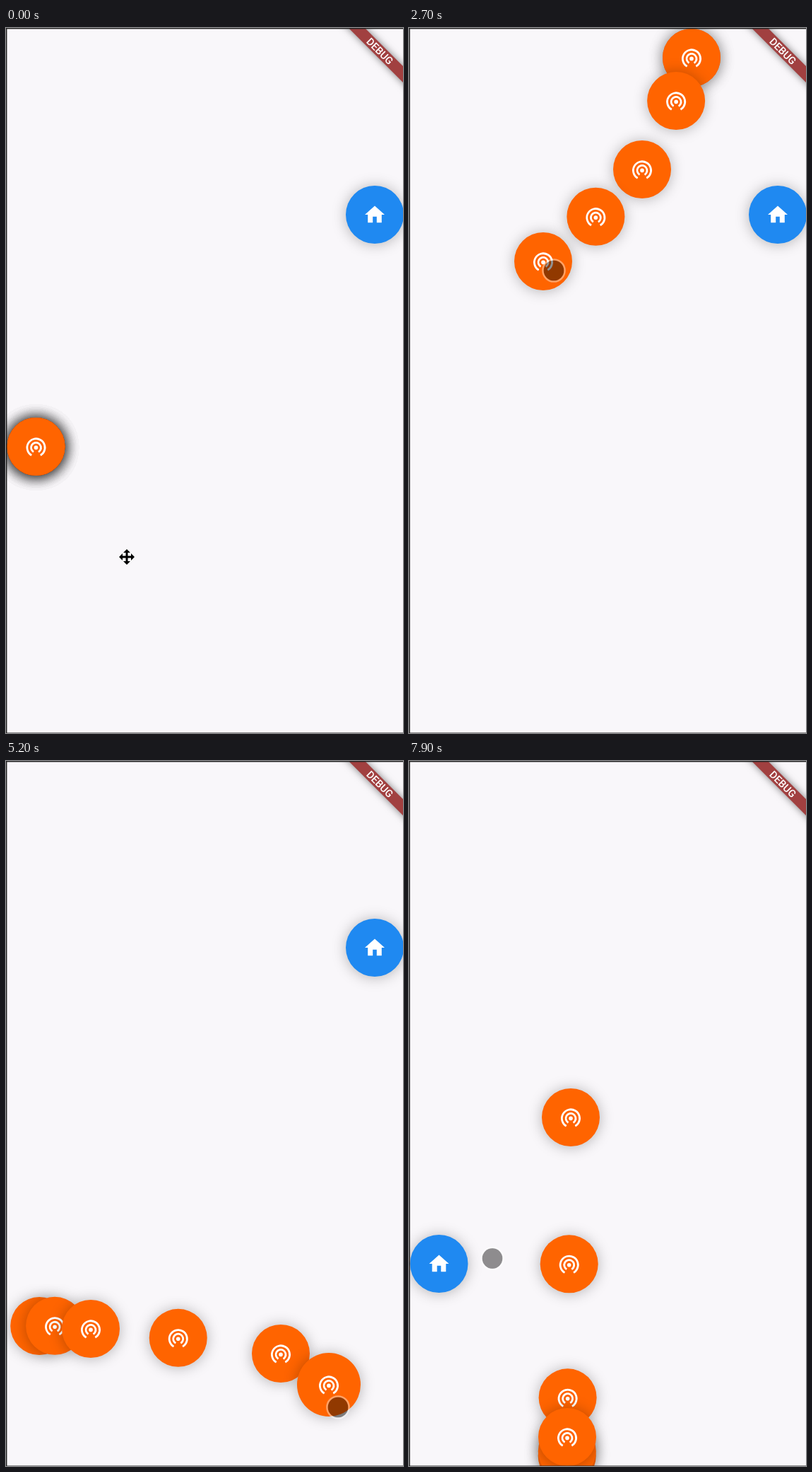
Recreate the animation shown at these times as an HTML page with a canvas. Size 562 by 997 pixels, loop 8 s.

```html
<!DOCTYPE html>
<html lang="en">
<head>
<meta charset="utf-8">
<title>Floating heads</title>
<style>
  html, body { margin: 0; width: 100%; height: 100%; overflow: hidden; background: #f9f7fa; }
  canvas { display: block; }
</style>
</head>
<body>
<canvas id="stage" width="562" height="997"></canvas>
<script>
const W = 562, H = 997, LOOP = 8000, STEP = 100;
const HEADS = 6, LAG = 100, THROW = 500, RADIUS = 41, HELD_RADIUS = 45;
const ctx = document.getElementById('stage').getContext('2d');

// A drag runs from the resting place through [time, x, y] points, the last being
// the release; the head is then thrown to an edge. grip: finger relative to head,
// then: where the finger goes afterwards.
function drag(rest, start, points, edge, grip, then) {
  const keys = [[start, ...rest], ...points];
  return { start, keys, release: keys[keys.length - 1][0], edge, grip, then };
}

const left = [42.5, 592], top1 = [400, 42], upperLeft = [42.5, 195],
      lowerLeft = [42.5, 800], top2 = [229, 42.5], bottom = [224, 956];
const drags = [
  drag(left, 300, [[600, 102, 699], [800, 255, 754], [900, 304, 678], [1000, 288, 572],
    [1240, 130, 790], [1400, 296, 646], [1500, 352, 494]], top1, [-37, -24], [1900, 404.5, 234.5]),
  drag(top1, 2300, [[2500, 330, 200], [2700, 190, 330]], upperLeft, [15, 13]),
  drag(upperLeft, 3150, [[3500, 53, 195], [3800, 320, 420], [4000, 240, 700]], lowerLeft, [25, 3]),
  drag(lowerLeft, 4600, [[4900, 120, 803], [5100, 389, 838], [5200, 457, 882],
    [5300, 488, 880], [5500, 390, 480]], top2, [13, 32]),
  drag(top2, 7100, [[7400, 229, 504]], bottom, [6, 8], [7900, 118, 703.5])
];
const homeDrags = [
  drag([522, 264], 6000, [[6300, 300, 470]], [42.5, 711], [5, 6], [6500, 191.5, 519.5])
];
const allDrags = [...drags, ...homeDrags].sort((a, b) => a.start - b.start);

const fingerStops = [[0, 171, 748]];
for (const d of allDrags) {
  for (const [t, x, y] of [d.keys[0], d.keys[d.keys.length - 1]])
    fingerStops.push([t, x + d.grip[0], y + d.grip[1]]);
  if (d.then) fingerStops.push(d.then);
}

const mix = (a, b, u) => a.map((v, i) => v + (b[i] - v) * u);
const held = (d, t) => t >= d.start && t < d.release;

// Smooth curve through the keys, starting from standstill.
function curve(keys, t) {
  const i = keys.findIndex(k => k[0] > t) - 1;
  const a = keys[i], b = keys[i + 1], span = b[0] - a[0], u = (t - a[0]) / span;
  const slope = (j, c) => {
    if (j === 0) return 0;
    const p = keys[j - 1], n = keys[j + 1] || keys[j];
    return (n[c] - p[c]) / (n[0] - p[0]);
  };
  return [1, 2].map(c => {
    const ease = u * u * (3 - 2 * u);
    return a[c] + (b[c] - a[c]) * ease
      + span * u * (1 - u) * ((1 - u) * slope(i, c) - u * slope(i + 1, c));
  });
}

// A throw swings past the edge once while it dies away.
function place(moves, t) {
  const d = moves.filter(m => m.start <= t).pop();
  if (!d) return moves[0].keys[0].slice(1);
  if (held(d, t)) return curve(d.keys, t);
  const u = Math.min(1, (t - d.release) / THROW);
  const away = Math.cos(Math.PI * u) * (1 - u) ** 1.8;
  return mix(d.edge, d.keys[d.keys.length - 1].slice(1), away);
}

function finger(t) {
  const d = allDrags.find(m => held(m, t));
  if (d) return curve(d.keys, t).map((v, i) => v + d.grip[i]);
  const next = fingerStops.findIndex(s => s[0] > t);
  if (next < 0) return fingerStops[fingerStops.length - 1].slice(1);
  const a = fingerStops[next - 1], b = fingerStops[next], u = (t - a[0]) / (b[0] - a[0]);
  return mix(a, b, u * u * (3 - 2 * u)).slice(1);
}

const radiusOf = (moves, t) => moves.some(d => held(d, t)) ? HELD_RADIUS : RADIUS;

function dot(x, y, r, color) {
  ctx.fillStyle = color;
  ctx.beginPath();
  ctx.arc(x, y, r, 0, 7);
  ctx.fill();
}

function shadow(color, blur, dy) {
  ctx.shadowColor = color;
  ctx.shadowBlur = blur;
  ctx.shadowOffsetY = dy;
}

function head([x, y], r, color, icon) {
  ctx.save();
  shadow('rgba(0,0,0,.28)', 20, 1);
  dot(x, y, r, color);
  ctx.restore();
  ctx.save();
  ctx.translate(x, y);
  ctx.scale(1.4, 1.4);
  icon();
  ctx.restore();
}

function signalIcon() {
  ctx.strokeStyle = '#fff';
  ctx.lineWidth = 2;
  for (const r of [5, 9]) {
    ctx.beginPath();
    ctx.arc(0, 1, r, Math.PI * 2 / 3, Math.PI * 7 / 3);
    ctx.stroke();
  }
  dot(0, 1, 2, '#fff');
}

const house = new Path2D('M-2 8v-6h4v6h5v-8h3L0-9-10 0h3v8z');
function homeIcon() {
  ctx.fillStyle = '#fff';
  ctx.fill(house);
}

const arm = new Path2D('M-1.5 0V-6H-5L0-11 5-6H1.5V0z');
function moveCursor(x, y) {
  ctx.save();
  ctx.translate(x, y);
  ctx.strokeStyle = '#fff';
  ctx.fillStyle = '#000';
  ctx.lineWidth = 1.5;
  for (let i = 0; i < 8; i++) {
    if (i < 4) ctx.stroke(arm); else ctx.fill(arm);
    ctx.rotate(Math.PI / 2);
  }
  ctx.restore();
}

function touch(x, y) {
  dot(x, y, 14.4, 'rgba(0,0,0,.43)');
  ctx.strokeStyle = 'rgba(255,255,255,.4)';
  ctx.lineWidth = 2.5;
  ctx.beginPath();
  ctx.arc(x, y, 15.6, 0, 7);
  ctx.stroke();
}

function banner() {
  ctx.save();
  ctx.translate(W, 0);
  ctx.rotate(Math.PI / 4);
  ctx.save();
  shadow('rgba(0,0,0,.5)', 11, 0);
  ctx.fillStyle = '#a14040';
  ctx.fillRect(-70, 38.2, 140, 16.3);
  ctx.restore();
  ctx.fillStyle = '#fff';
  ctx.font = '500 14.5px Roboto, sans-serif';
  ctx.textAlign = 'center';
  ctx.fillText('DEBUG', 0, 51.5);
  ctx.restore();
}

function border() {
  ctx.fillStyle = '#222';
  ctx.fillRect(0, 0, W, 1.4);
  ctx.fillRect(0, 0, 1.4, H);
  ctx.fillRect(0, H - .5, W, .5);
}

function draw(t) {
  ctx.fillStyle = '#f9f7fa';
  ctx.fillRect(0, 0, W, H);
  head(place(homeDrags, t), radiusOf(homeDrags, t), '#1f89f1', homeIcon);
  for (let i = HEADS - 1; i >= 0; i--)
    head(place(drags, t - i * LAG), i ? RADIUS : radiusOf(drags, t), '#ff6400', signalIcon);
  banner();
  border();
  (t < 200 ? moveCursor : touch)(...finger(t));
}

const began = performance.now();
function tick() {
  const t = (performance.now() - began) % LOOP;
  draw(Math.floor(t / STEP) * STEP);
  requestAnimationFrame(tick);
}
tick();
</script>
</body>
</html>
```
